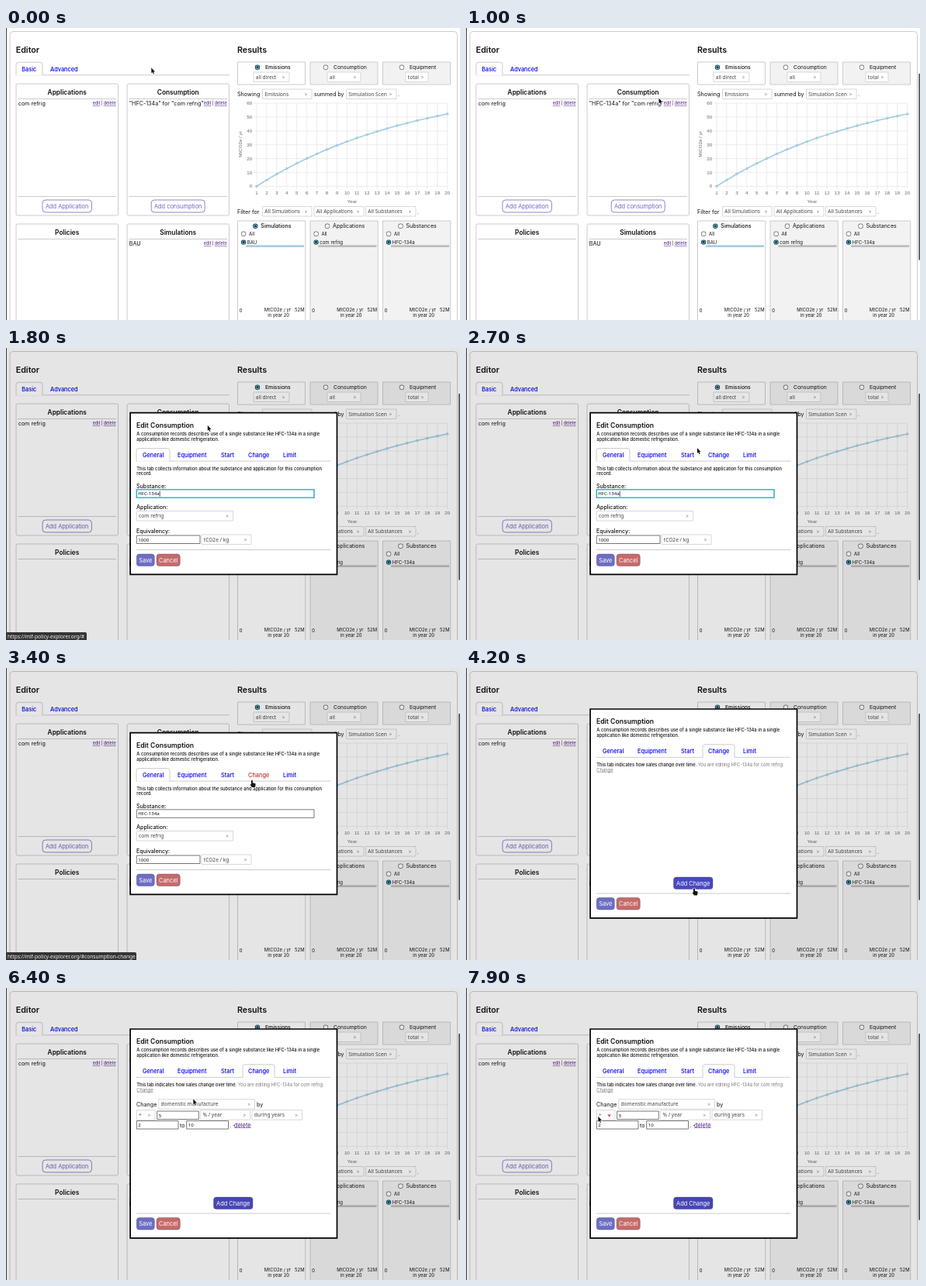
These frames come from a looping animation (585 by 377 pixels, 8000 ms). An HTML page with a canvas:

```html
<!DOCTYPE html>
<html lang="en">
<head>
<meta charset="utf-8">
<title>Policy editor</title>
<style>
html, body { margin: 0; width: 100%; height: 100%; overflow: hidden; background: #fff; }
canvas { display: block; width: 585px; height: 377px; }
</style>
</head>
<body>
<canvas id="stage"></canvas>
<script>
const W = 585, H = 377, LOOP = 8000, STEP = 100;
const UI = 'Inter, sans-serif', FIELD = '"Noto Sans", sans-serif', AXIS = '"Liberation Sans", sans-serif';
const INK = '#111', BORDER = '#ccc', BLUE = '#0000e0', VISITED = '#551a8b', RED = '#c03030', SKY = '#a6cee3';
const ROOT_URL = 'https://mlf-policy-explorer.org/#';

const canvas = document.getElementById('stage');
const ctx = canvas.getContext('2d');
const ratio = window.devicePixelRatio || 1;
canvas.width = W * ratio;
canvas.height = H * ratio;

// ---- primitives ----
function text(str, x, y, size, { color = INK, weight = 400, align = 'left', font = UI, underline = false } = {}) {
  ctx.font = `${weight} ${size}px ${font}`;
  ctx.textAlign = align;
  ctx.fillStyle = color;
  ctx.fillText(str, x, y);
  const width = ctx.measureText(str).width;
  if (underline) ctx.fillRect(align === 'right' ? x - width : x, y + 0.8, width, 0.5);
  return width;
}

function box(x1, y1, x2, y2, { fill, stroke = BORDER, line = 1, radius = 0 } = {}) {
  ctx.beginPath();
  ctx.roundRect(x1, y1, x2 - x1, y2 - y1, radius);
  if (fill) { ctx.fillStyle = fill; ctx.fill(); }
  if (stroke) { ctx.strokeStyle = stroke; ctx.lineWidth = line; ctx.stroke(); }
}

function path(points, color, width = 1) {
  ctx.beginPath();
  points.forEach(([x, y]) => ctx.lineTo(x, y));
  ctx.strokeStyle = color;
  ctx.lineWidth = width;
  ctx.stroke();
}

const rule = (x1, x2, y, color = BORDER) => path([[x1, y], [x2, y]], color);

function dot(x, y, r, color) {
  ctx.beginPath();
  ctx.arc(x, y, r, 0, Math.PI * 2);
  ctx.fillStyle = color;
  ctx.fill();
}

// ---- widgets ----
function radio(x, y, on) {
  dot(x, y, 3.2, on ? '#08485e' : '#666');
  dot(x, y, on ? 2.2 : 2.5, '#fff');
  if (on) dot(x, y, 1.8, '#08485e');
}

function select(x1, y1, x2, label, hover = false) {
  box(x1, y1, x2, y1 + 12.5, { fill: '#fff', stroke: '#d8d8d8' });
  text(label, x1 + 2.8, y1 + 8.5, 6.6, { font: FIELD, color: hover ? RED : '#444' });
  const x = x2 - 7.4, y = y1 + 6.6;
  const tip = hover ? [[x - 1.5, y - 1], [x, y + 1.2], [x + 1.5, y - 1]] : [[x - 1.4, y - 1.3], [x + 1.2, y], [x - 1.4, y + 1.3]];
  path(tip, hover ? RED : '#999', hover ? 1.2 : 0.8);
}

function input(x1, y1, x2, value, focused = false) {
  box(x1, y1, x2, y1 + 10.5, { fill: '#fff', stroke: focused ? '#38b4c8' : '#777', line: focused ? 1.6 : 1 });
  const width = text(value, x1 + 2, y1 + 7.6, 6.1, { font: FIELD, weight: 500 });
  if (focused) path([[x1 + 2.5 + width, y1 + 2], [x1 + 2.5 + width, y1 + 9]], '#000', 0.7);
}

function button(x1, y1, x2, label, fill, size = 7.4) {
  box(x1, y1, x2, y1 + 15.5, { fill, stroke: 'rgba(60,60,110,.35)', radius: 3.5 });
  text(label, (x1 + x2) / 2, y1 + 10.6, size, { color: '#fff', align: 'center' });
}

function editLinks(right, y, hover = false) {
  text('delete', right, y, 5.5, { color: VISITED, align: 'right', underline: true });
  text('|', right - 18.3, y, 5.5, { align: 'center' });
  text('edit', right - 20.3, y, 5.5, { color: hover ? RED : VISITED, align: 'right', underline: true });
}

function tabs(items, active, y, left, right, hover) {
  rule(left, right, y + 5);
  items.forEach(([label, x, x1, x2]) => {
    if (label === active) {
      box(x1, y - 11.5, x2, y + 5, { fill: '#fff', radius: [3, 3, 0, 0] });
      path([[x1 + 0.5, y + 5], [x2 - 0.5, y + 5]], '#fff', 1.4);
    }
    text(label, x, y, 7.35, { color: label === hover ? RED : BLUE, weight: 500 });
  });
}

// ---- page ----
function listPanel(x, y, title, { row, action, hover } = {}) {
  box(x, y, x + 131.5, y + 170, { fill: '#fff', radius: 2 });
  text(title, x + 65.7, y + 13.5, 8.3, { weight: 600, align: 'center' });
  rule(x + 2.5, x + 129, y + 19.5);
  if (row) {
    text(row, x + 2.7, y + 28.3, 7.2);
    editLinks(x + 128.7, y + 27.3, hover);
  }
  if (action) {
    const [label, half] = action;
    rule(x + 2.5, x + 129, y + 145.5);
    box(x + 65.7 - half, y + 150, x + 65.7 + half, y + 166, { fill: '#fff', stroke: '#8a8acb', radius: 4 });
    text(label, x + 65.7, y + 161, 7.4, { color: '#6868bc', align: 'center' });
  }
}

function metricCard(x, label, dotX, choice, s1, s2, on) {
  box(x, 44, x + 87, 73, { fill: on ? '#fff' : '#f2f2f2' });
  radio(dotX, 50.7, on);
  text(label, dotX + 10, 53.4, 6.8, { weight: on ? 500 : 400 });
  select(s1, 57, s2, choice);
}

function chart() {
  const px = year => 323 + (year - 1) * 12.93;
  const py = value => 204.3 - value * 1.787;
  const value = year => 75.5 * (1 - 0.94 ** (year - 1));
  const axis = { font: AXIS, color: '#666', align: 'center' };
  const years = Array.from({ length: 20 }, (_, i) => i + 1);
  years.forEach(year => {
    path([[px(year), py(60)], [px(year), 208]], '#e4e4e4', 0.7);
    text(year, px(year), 214.6, 6.2, axis);
  });
  for (let v = 0; v <= 60; v += 10) {
    path([[319, py(v)], [px(20), py(v)]], '#e4e4e4', 0.7);
    text(v, 317.2, py(v) + 2.1, 6.2, { ...axis, align: 'right' });
  }
  text('Year', 446, 226, 6.2, axis);
  ctx.save();
  ctx.translate(304.4, 150);
  ctx.rotate(-Math.PI / 2);
  text('MtCO2e / yr', 0, 0, 6.2, axis);
  ctx.restore();
  path(years.map(year => [px(year), py(value(year))]), SKY, 1.7);
  years.forEach(year => dot(px(year), py(value(year)), 1.8, SKY));
}

function filterPanel(x, title, dotX, item, on) {
  box(x, 249, x + 87.3, 390, { fill: on ? '#fff' : '#f2f2f2' });
  radio(dotX, 255.8, on);
  text(title, dotX + 7, 258.3, 7.1, { weight: on ? 500 : 400 });
  radio(x + 7.6, 265.7, false);
  text('All', x + 14.5, 268, 6);
  ctx.fillStyle = on ? SKY : '#bcbcbc';
  ctx.fillRect(x + 10.5, 280.3, 75, 2.7);
  radio(x + 7.6, 276.6, true);
  text(item, x + 12.2, 278.8, 6.1);
  text('0', x + 2.3, 366.7, 5.8);
  text('MtCO2e / yr', x + 68.5, 366.4, 5.9, { align: 'right' });
  text('in year 20', x + 66.5, 373.4, 5.9, { align: 'right' });
  text('52M', x + 86, 366.4, 5.9, { align: 'right' });
}

function page(t) {
  ctx.fillStyle = '#fff';
  ctx.fillRect(0, 0, W, H);
  path([[0.5, 0], [0.5, H]], '#444');
  box(5, 4.5, 581.5, 400, { radius: 4 });
  text('Editor', 12.7, 32, 10.7, { weight: 600 });
  text('Results', 298, 32, 10.7, { weight: 600 });
  tabs([['Basic', 20.3, 13, 47], ['Advanced', 57]], 'Basic', 55.8, 13, 288);

  listPanel(13, 72, 'Applications', { row: 'com refrig', action: ['Add Application', 31.7] });
  listPanel(156, 72, 'Consumption', {
    row: '"HFC-134a" for "com refrig"', action: ['Add consumption', 34.5], hover: t >= 1300 && t < 1800
  });
  listPanel(13, 253, 'Policies');
  listPanel(156, 253, 'Simulations', { row: 'BAU' });

  metricCard(298.5, 'Emissions', 324, 'all direct', 319, 365, true);
  metricCard(392, 'Consumption', 412, 'all', 414, 457, false);
  metricCard(485.5, 'Equipment', 510, 'total', 515, 544, false);

  text('Showing', 298, 88, 7.2);
  select(330.5, 79, 394, 'Emissions');
  text('summed by', 397, 88, 7);
  select(438.5, 79, 503, 'Simulation Scen');
  text('.', 505, 88, 7.2);
  chart();
  text('Filter for', 298, 239.5, 7.2);
  select(330.5, 230.5, 394, 'All Simulations');
  select(397, 230.5, 461, 'All Applications');
  select(463.5, 230.5, 528, 'All Substances');
  text('.', 530, 239.5, 7.2);

  filterPanel(298.5, 'Simulations', 321.3, 'BAU', true);
  filterPanel(392, 'Applications', 414, 'com refrig', false);
  filterPanel(485.5, 'Substances', 508.5, 'HFC-134a', false);

  if (t >= 400) box(583.3, 59, 585, 299.5, { fill: '#555', stroke: null });
}

// ---- dialog ----
function dialogFrame(top, bottom, active, hover) {
  ctx.fillStyle = 'rgba(0,0,0,.1)';
  ctx.fillRect(0, 0, W, H);
  box(160.1, top - 0.3, 426.5, bottom + 0.3, { fill: '#fff', stroke: '#000', line: 1.7 });
  const small = { weight: 500 };
  text('Edit Consumption', 168, top + 19, 8.65, { weight: 600 });
  text('A consumption records describes use of a single substance like HFC-134a in a single', 168.3, top + 29, 5.82, small);
  text('application like domestic refrigeration.', 168.3, top + 36, 5.82, small);
  tabs([
    ['General', 176, 168, 211], ['Equipment', 221], ['Start', 277],
    ['Change', 312, 305, 346], ['Limit', 357]
  ], active, top + 57, 168, 418.5, hover);
  rule(168, 418.5, bottom - 31.5);
  button(168.3, bottom - 26, 191.3, 'Save', '#6d6dc3');
  button(194, bottom - 26, 224.3, 'Cancel', '#c66a6a');
}

function generalTab(t) {
  dialogFrame(84, 292, 'General', t >= 3000 && 'Change');
  const small = { weight: 500 };
  text('This tab collects information about the substance and application for this consumption', 168.3, 157.5, 5.79, small);
  text('record.', 168.3, 164.3, 5.79, small);
  text('Substance:', 168, 180.7, 7.1, small);
  input(168.3, 182.8, 397, 'HFC-134a', t < 3400);
  text('Application:', 168, 208.3, 7.1, small);
  select(168.3, 210.5, 292.5, 'com refrig');
  text('Equivalency:', 168, 239.2, 7.1, small);
  input(168.3, 242, 250, '1000');
  select(252, 241, 316, 'tCO2e / kg');
}

function changeTab(t) {
  dialogFrame(53.3, 322.6, 'Change');
  const gray = { color: '#777' };
  const lead = text('This tab indicates how sales change over time. ', 168.3, 127, 5.79, { weight: 500 });
  text('You are editing HFC-134a for com refrig.', 168.3 + lead, 127, 5.79, gray);
  text('Change', 168.3, 133.8, 5.79, { ...gray, underline: true });
  if (t >= 5200) changeRow(t);
  const hover = t >= 4200 && t < 5800;
  button(267.5, 270, 318, 'Add Change', hover ? '#4848c0' : '#4646b4');
}

function changeRow(t) {
  text('Change', 168, 152.5, 7.2);
  select(196.7, 143.7, 320.5, 'domenstic manufacture', t >= 6500 && t < 7600);
  text('by', 323, 152.5, 7.2);
  select(168.3, 157.7, 192, '+', t >= 7800);
  input(194.7, 159, 248.3, '5');
  select(250.7, 157.7, 314.7, '% / year');
  select(317, 157.7, 381.5, 'during years');
  input(168.3, 171.5, 222, '2');
  text('to', 224, 179.5, 7.2);
  input(232.7, 171.5, 286.5, '10');
  text('. -', 288.5, 179.5, 6.5);
  text('delete', 294, 179.5, 7.4, { color: VISITED, underline: true });
}

// ---- pointer and status line ----
const pointerKeys = [
  [0, 187, 51], [300, 187, 51], [1200, 257, 96], [1700, 261, 98.5], [1800, 259.5, 99.5], [2500, 259.5, 99.5],
  [2800, 311, 139], [3400, 317, 145], [3700, 317, 145], [4200, 294, 284.5], [4600, 293, 284],
  [4800, 290, 278.5], [5600, 290, 278.5], [6300, 246, 139], [6500, 236, 147], [6800, 224, 147],
  [7400, 224, 147], [7900, 170, 165.5]
];
const handSpans = [[1300, 1800], [3000, 3500], [4200, 5800]];

function pointerAt(t) {
  const next = pointerKeys.findIndex(key => key[0] > t);
  if (next < 0) return pointerKeys.at(-1).slice(1);
  const [t0, x0, y0] = pointerKeys[next - 1], [t1, x1, y1] = pointerKeys[next];
  const u = (t - t0) / (t1 - t0), k = u * u * (3 - 2 * u);
  return [x0 + (x1 - x0) * k, y0 + (y1 - y0) * k];
}

function pointer(t) {
  const hand = handSpans.some(([from, to]) => t >= from && t < to);
  const shape = hand
    ? 'M-1 .3Q0-.6 .9 .3V3.2L4 4Q5 4.4 4.6 6L3.9 9H-.1L-2.4 5.8Q-2.5 4.6-1 5.4Z'
    : 'M.3.3V7.2L1.8 5.9L2.9 8.4L4 7.9L2.9 5.4H5Z';
  const outline = new Path2D(shape);
  ctx.save();
  ctx.translate(...pointerAt(t));
  ctx.lineJoin = 'round';
  ctx.strokeStyle = '#fff';
  ctx.lineWidth = 1.3;
  ctx.stroke(outline);
  ctx.fillStyle = '#111';
  ctx.fill(outline);
  ctx.restore();
}

const statusSpans = [
  [1300, 2100, '', 104], [3000, 3800, 'consumption-change', 168], [4300, 5700, '', 104]
];

function statusLine(t) {
  for (const [start, end, hash, width] of statusSpans) {
    const alpha = Math.min(1, (t - start + STEP) / 200, (end + 200 - t) / 300);
    if (alpha <= 0) continue;
    ctx.globalAlpha = alpha;
    box(-3, 367, width, 380, { fill: '#353535', stroke: null, radius: 2 });
    text(ROOT_URL + hash, 2, 374.5, 6.6, { font: FIELD, color: '#f0f0f0' });
    ctx.globalAlpha = 1;
  }
}

function draw(now) {
  const t = Math.floor((now % LOOP) / STEP) * STEP;
  ctx.setTransform(ratio, 0, 0, ratio, 0, 0);
  page(t);
  if (t >= 3500) changeTab(t);
  else if (t >= 1800) generalTab(t);
  statusLine(t);
  pointer(t);
}

const start = performance.now();
function tick() {
  draw(performance.now() - start);
  requestAnimationFrame(tick);
}
tick();
</script>
</body>
</html>
```
